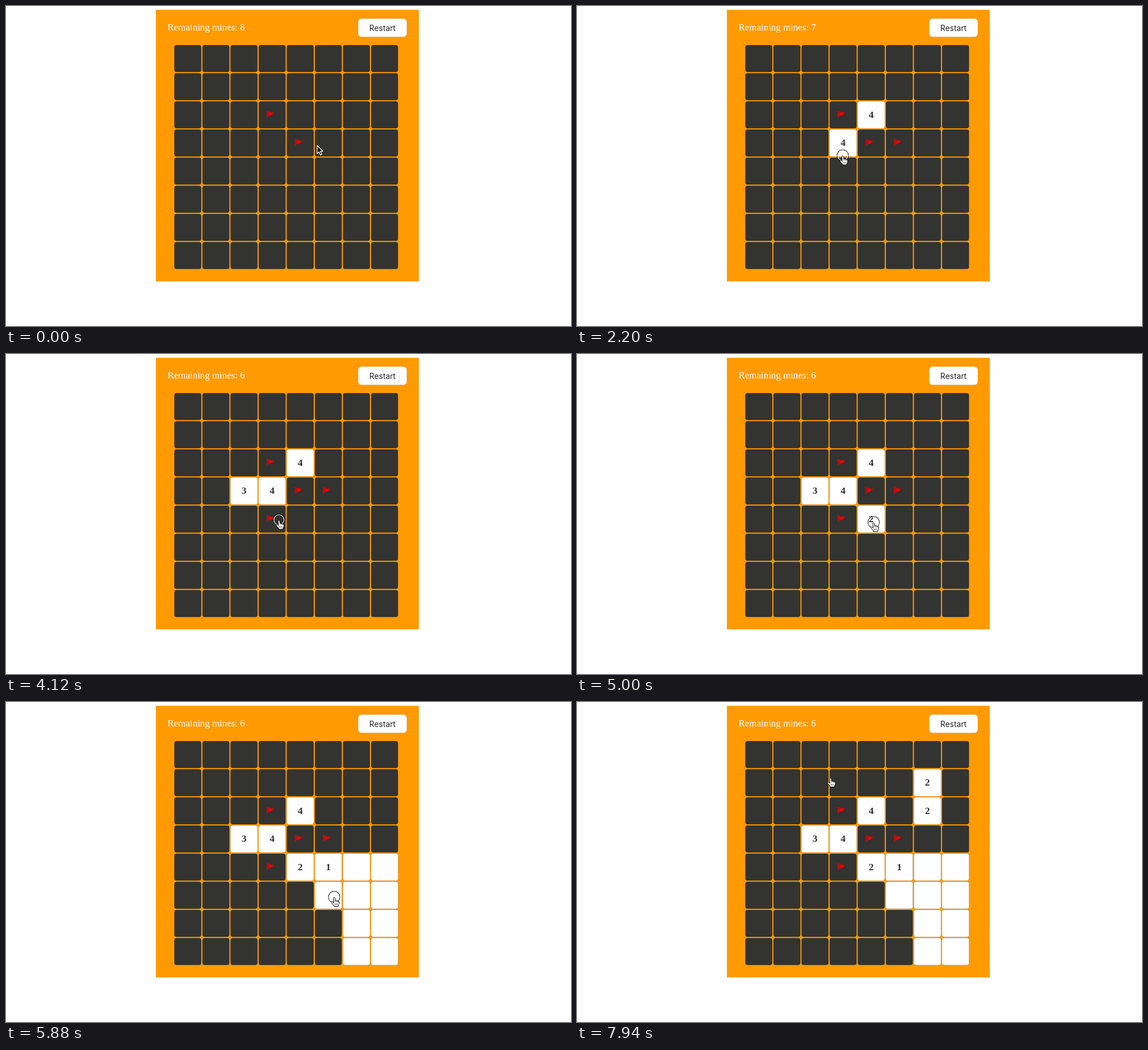
Animation, 995 px wide and 563 px high, one loop 8000 ms. Source, as an HTML page with a canvas:

```html
<!DOCTYPE html>
<html lang="en">
<head>
<meta charset="utf-8">
<title>Minesweeper</title>
<style>
  html, body { margin: 0; width: 100%; height: 100%; overflow: hidden; background: #fefefe; }
  canvas { display: block; }
</style>
</head>
<body>
<canvas id="stage" width="995" height="563"></canvas>
<script>
const ctx = document.getElementById('stage').getContext('2d');
const LOOP = 8000, TICK = 147, TICK_OFFSET = 12;
const MOVE_TICKS = 4, RING_TICKS = 2, ARROW_TICKS = 3;
const ORANGE = '#ff9a03', DARK = '#333331', WHITE = '#fefefe';
const MINES = 10;
const GRID = { x: 296.4, y: 68.8, pitch: 49.5, size: 47.5, count: 8 };

// The pointer eases from stop to stop; a stop with an action is a click on the cell below it.
const stop = (tick, x, y, action) => ({
  tick, x, y, action,
  column: Math.floor((x - GRID.x) / GRID.pitch),
  row: Math.floor((y - GRID.y) / GRID.pitch)
});
const STOPS = [
  stop(1, 548, 245.5),
  stop(5, 574, 259, 'flag'),
  stop(11, 521.5, 204, '4'),
  stop(14, 470, 242, '4'),
  stop(16, 466, 284),
  stop(19, 425, 252, '3'),
  stop(20, 440, 285),
  stop(27, 473, 291, 'flag'),
  stop(34, 522.5, 296, '2'),
  stop(40, 578, 343, 'clear'),
  stop(44, 626, 209, '2'),
  stop(46, 625.5, 213.5),
  stop(51, 618, 138, '2'),
  stop(54, 446.5, 133)
];

const cellX = column => GRID.x + column * GRID.pitch;
const cellY = row => GRID.y + row * GRID.pitch;
const smooth = k => k * k * (3 - 2 * k);

function roundRect(x, y, w, h, r, fill) {
  ctx.beginPath();
  ctx.roundRect(x, y, w, h, r);
  ctx.fillStyle = fill;
  ctx.fill();
}

function text(string, x, y, font, color, align) {
  ctx.font = font;
  ctx.fillStyle = color;
  ctx.textAlign = align;
  ctx.fillText(string, x, y);
}

function drawCell(column, row, fill, label = '') {
  roundRect(cellX(column), cellY(row), GRID.size, GRID.size, 4, fill);
  text(label, cellX(column) + 23.8, cellY(row) + 28.7,
    'bold 17.5px "Liberation Serif", serif', DARK, 'center');
}

// A click on an empty cell also opens the corner below and to the right of it.
function drawClearedArea({ column, row }) {
  drawCell(column, row, WHITE);
  drawCell(column, row - 1, WHITE, '1');
  for (let c = column + 1; c < GRID.count; c++)
    for (let r = row - 1; r < GRID.count; r++) drawCell(c, r, WHITE);
}

function drawFlag({ column, row }) {
  ctx.save();
  ctx.translate(cellX(column), cellY(row));
  ctx.fillStyle = '#8c2a22';
  ctx.fillRect(14.2, 16.5, 1, 13);
  const cloth = ctx.createLinearGradient(15, 0, 28, 0);
  cloth.addColorStop(0, '#c40508');
  cloth.addColorStop(0.5, '#e60709');
  cloth.addColorStop(1, '#b00406');
  ctx.fillStyle = cloth;
  ctx.fill(new Path2D('M15 17.2Q21 19.8 28.2 20Q24 24.8 15 27Z'));
  ctx.restore();
}

const ARROW = new Path2D('M0 0V14L3.3 11L5.7 16.6L8 15.6L5.7 10.2H10Z');
const HAND = new Path2D('M-1.6 2.4C-1.6 .4 1.2 .4 1.4 2.4L1.9 6.6C2.4 5.3 4.2 5.5 4.5 7' +
  'C5.2 6.2 6.6 6.5 6.9 7.8C7.8 7.2 8.8 7.8 8.8 9C8.8 12 7.8 13.2 7.2 14.6V16.4H-.6V15' +
  'C-2 13.4-3.3 12-4.8 10.2C-6 8.6-4.3 7.4-3 8.6L-1 10.2Z');
const FINGERS = new Path2D('M1.9 6.6V9M4.5 7V9.2M6.9 7.8V9.4M1 11.4V14M3.2 11.4V14M5.4 11.4V14');

function drawPointer(x, y, hand) {
  const shape = hand ? HAND : ARROW;
  ctx.save();
  ctx.translate(x, y);
  ctx.lineJoin = 'round';
  ctx.lineWidth = hand ? 1 : 1.2;
  ctx.fillStyle = hand ? '#fff' : '#000';
  ctx.strokeStyle = hand ? '#000' : '#fff';
  ctx.fill(shape);
  ctx.stroke(shape);
  if (hand) {
    ctx.lineWidth = 0.7;
    ctx.stroke(FINGERS);
  }
  ctx.restore();
}

function drawRing(x, y) {
  ctx.lineWidth = 1.1;
  for (const [radius, color] of [[10, '#000'], [9, '#fff']]) {
    ctx.beginPath();
    ctx.arc(x, y, radius, 0, 2 * Math.PI);
    ctx.strokeStyle = color;
    ctx.stroke();
  }
}

function pointerAt(tick) {
  const next = STOPS.findIndex(s => s.tick >= tick);
  const to = STOPS[next], from = STOPS[next - 1] || to;
  const duration = Math.min(MOVE_TICKS, to.tick - from.tick) || 1;
  const k = smooth(Math.min(1, Math.max(0, tick - from.tick) / duration));
  return [from.x + (to.x - from.x) * k, from.y + (to.y - from.y) * k];
}

function draw(time) {
  const tick = Math.min(54, Math.floor((time % LOOP + TICK_OFFSET) / TICK));
  const clicks = STOPS.filter(s => s.action && s.tick <= tick);
  const flags = [{ column: 3, row: 2 }, { column: 4, row: 3 },
    ...clicks.filter(s => s.action === 'flag')];

  ctx.fillStyle = WHITE;
  ctx.fillRect(0, 0, 995, 563);
  ctx.fillStyle = ORANGE;
  ctx.fillRect(264, 6.7, 463, 477.8);

  text('Remaining mines: ' + (MINES - flags.length), 284.6, 43,
    '16.9px "Liberation Serif", serif', '#fff', 'left');
  roundRect(620, 22, 86, 32.5, 6, '#e4d6c2');
  roundRect(620.8, 22.8, 84.4, 30.9, 5.2, WHITE);
  text('Restart', 663, 44.2, '13.8px Inter, sans-serif', '#262626', 'center');

  for (let row = 0; row < GRID.count; row++)
    for (let column = 0; column < GRID.count; column++) drawCell(column, row, DARK);

  for (const click of clicks) {
    if (click.action === 'clear') drawClearedArea(click);
    else if (click.action !== 'flag') drawCell(click.column, click.row, WHITE, click.action);
  }
  flags.forEach(drawFlag);

  const [x, y] = pointerAt(tick);
  if (clicks.some(click => tick < click.tick + RING_TICKS)) drawRing(x, y);
  drawPointer(x, y, tick >= ARROW_TICKS);
}

function frame() {
  draw(performance.now());
  requestAnimationFrame(frame);
}
frame();
</script>
</body>
</html>
```
